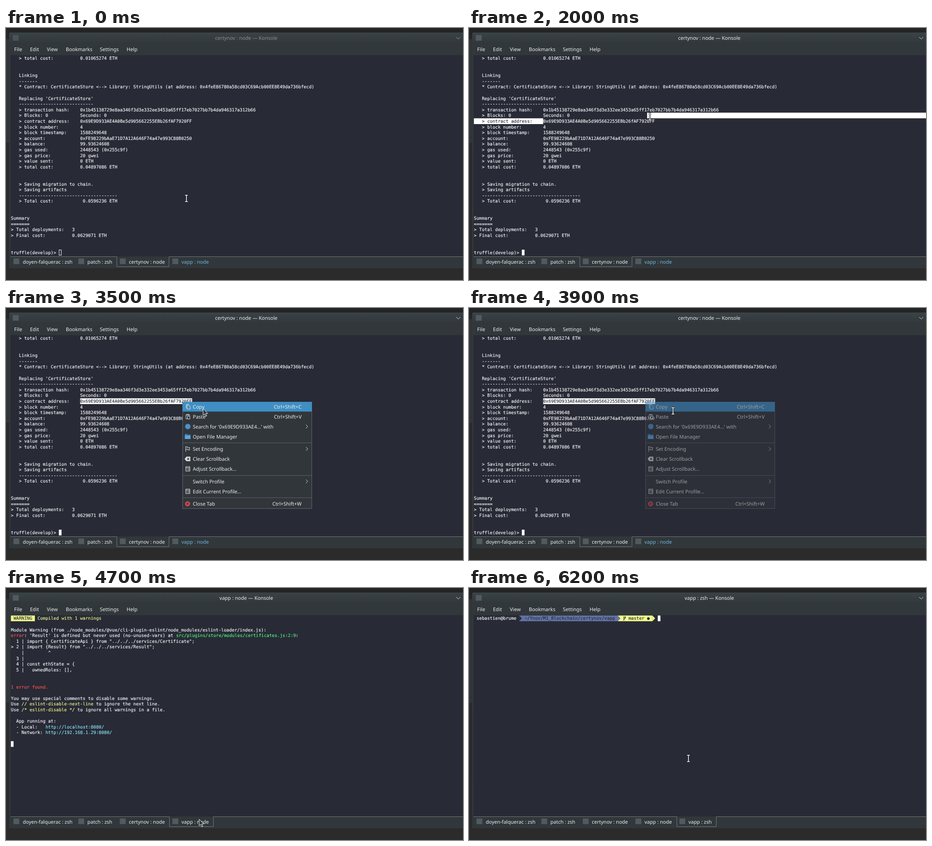
Animation, 1008 px wide and 556 px high, one loop 8000 ms. Source, as an HTML page:

```html
<!DOCTYPE html>
<html lang="en">
<head>
<meta charset="utf-8">
<title>Terminal session</title>
<style>
  html, body { margin: 0; width: 100%; height: 100%; overflow: hidden; background: #2a2b2c; }
  svg { display: block; width: 1008px; height: 556px; }
  text { white-space: pre; text-rendering: geometricPrecision; }
  .ui { font: 11px "Noto Sans", sans-serif; fill: #eff0f1; }
  .mono { font: 9.764px "DejaVu Sans Mono", monospace; color: #fcfcfc; }
  .mono text { fill: currentColor; stroke: currentColor; stroke-width: .15; }
  .dark { color: #282a36; }
  .line { fill: none; stroke: #e2e4e5; stroke-width: 1; }
</style>
</head>
<body>
<svg id="stage" viewBox="0 0 1008 556"></svg>
<script>
const LOOP = 8000, STEP = 100;
const CELL = 5.878, ROW = 12.6, LEFT = 10.8, TOP = 60.7;
const colX = c => LEFT + c * CELL;
const rowY = r => TOP + r * ROW;

const esc = s => s.replace(/&/g, '&amp;').replace(/</g, '&lt;');
const rect = (x, y, w, h, fill, extra = '') =>
  `<rect x="${x}" y="${y}" width="${w}" height="${h}" fill="${fill}" ${extra}/>`;
const path = (d, extra = 'class="line"') => `<path d="${d}" ${extra}/>`;
const label = (s, x, y, extra = '') => `<text class="ui" x="${x}" y="${y}" ${extra}>${esc(s)}</text>`;
const cells = (r, c, s, color) =>
  `<text x="${colX(c)}" y="${Math.round(rowY(r) + 9.75)}" ${color ? `style="color:${color}"` : ''}>${esc(s)}</text>`;
const block = (r, c) => rect(colX(c), rowY(r), CELL, ROW, '#fff');
const lines = list => list.map((s, r) => s ? cells(r, 0, s) : '').join('');

// Deployment output
const field = (name, value) => ('   > ' + name + ':').padEnd(26) + value;
const deploy = lines([
  field('total cost', '0.01065274 ETH'), '', '',
  '   Linking', '   -------',
  '   * Contract: CertificateStore <--> Library: StringUtils (at address: 0x4feE86780a58cd03C69Acb00EE8E49da736bfecd)', '',
  "   Replacing 'CertificateStore'", '   ' + '-'.repeat(28),
  field('transaction hash', '0x1b45138729e8aa346f3d3e332ee3453a65ff17eb7027bb7b4da946317a312b66'),
  '   > Blocks: 0'.padEnd(26) + 'Seconds: 0',
  field('contract address', '0x69E9D933AE4A0Be5d905662255EBb26fAF7920FF'),
  field('block number', '4'),
  field('block timestamp', '1588249648'),
  field('account', '0xFE98229bAaE71D7A12A646F74a47e993C88B0250'),
  field('balance', '99.93624608'),
  field('gas used', '2448543 (0x255c9f)'),
  field('gas price', '20 gwei'),
  field('value sent', '0 ETH'),
  field('total cost', '0.04897086 ETH'), '', '',
  '   > Saving migration to chain.', '   > Saving artifacts', '   ' + '-'.repeat(37),
  field('Total cost', ' 0.0596236 ETH'), '', '',
  'Summary', '=======',
  '> Total deployments:   3', '> Final cost:          0.0629071 ETH', '', '',
  'truffle(develop)> '
]);

// Dev server output
const RED = '#ff5555', GREEN = '#50fa7b', YELLOW = '#f1fa8c', CYAN = '#8be9fd', BLUE = '#6272a4';
const server = rect(LEFT, TOP, 9 * CELL, ROW, YELLOW) +
  cells(0, 1, 'WARNING', '#282a36') + cells(0, 10, 'Compiled with 1 warnings', YELLOW) +
  lines([
    '', '',
    'Module Warning (from ./node_modules/@vue/cli-plugin-eslint/node_modules/eslint-loader/index.js):',
    "     : 'Result' is defined but never used (no-unused-vars) at " + ' '.repeat(45) + ':',
    '  1 | import { CertificateApi } from "../../../services/Certificate";',
    '> 2 | import {Result} from "../../../services/Result";',
    '    |         ^', '  3 |', '  4 | const ethState = {', '  5 |   ownedRoles: [],',
    '', '', '', '',
    'You may use special comments to disable some warnings.',
    'Use ' + ' '.repeat(27) + ' to ignore the next line.',
    'Use ' + ' '.repeat(20) + ' to ignore all warnings in a file.', '',
    '  App running at:', '  - Local:', '  - Network:'
  ]) +
  cells(3, 0, 'error', RED) +
  cells(3, 62, 'src/plugins/store/modules/certificates.js:2:9', GREEN) +
  cells(12, 0, '1 error found.', RED) +
  cells(15, 4, '// eslint-disable-next-line', YELLOW) +
  cells(16, 4, '/* eslint-disable */', YELLOW) +
  cells(19, 13, 'http://localhost:8080/', CYAN) +
  cells(20, 13, 'http://192.168.1.29:8080/', CYAN) +
  block(22, 0);

// Shell prompt
const wedge = (c, fill) =>
  path(`M${colX(c)} ${TOP}l${CELL} ${ROW / 2}l${-CELL} ${ROW / 2}z`, `fill="${fill}"`);
const prompt = rect(colX(17), TOP, 37 * CELL, ROW, BLUE) + wedge(17, '#282a36') +
  rect(colX(54), TOP, 13 * CELL, ROW, YELLOW) + wedge(54, BLUE) + wedge(67, YELLOW) +
  cells(0, 1, 'sebastien@brume') +
  cells(0, 19, '~/Ynov/M1_Blockchain/certynov/vapp', '#282a36') +
  path('M341.5 62.5V72M341.5 69.5L344.5 66.5V64M342.8 65.5L344.5 63.5L346 65.5', 'fill="none" stroke="#282a36" stroke-width="1.1"') +
  cells(0, 58, 'master ●', '#282a36') + block(0, 69);

// Context menu: name, middle y, shortcut or ">" for a submenu
const entries = [
  ['Copy', 217.5, 'Ctrl+Shift+C'], ['Paste', 239.5, 'Ctrl+Shift+V'],
  ["Search for '0x69E9D933AE4...' with", 261.5, '>'], ['Open File Manager', 283.5],
  ['Set Encoding', 311, '>'], ['Clear Scrollback', 333], ['Adjust Scrollback...', 355],
  ['Switch Profile', 382.5, '>'], ['Edit Current Profile...', 404.5],
  ['Close Tab', 432, 'Ctrl+Shift+W']
];
const sheet = y => path(`M396.5 ${y - 5}h9v10h-9zM396.5 ${y - 2.5}h9M398 ${y}h1.5M398 ${y + 2.5}h1.5M401 ${y}h3.5M401 ${y + 2.5}h3.5`);
const menuIcons =
  path('M397.5 221.5v-9h6M399.5 214.5h4l2.5 2.5v6h-6.5z') +
  path('M399 235.5h-2v9h3M399 234.5h4v2h-4zM403 235.5h2v2M400.5 238.5h5v6.5h-5z') +
  '<circle cx="401" cy="261.5" r="6" fill="#4c8fc9"/>' +
  path('M394.5 278h5l1.5 1.5h6v9.5h-12.5z', 'fill="#3a7fbf"') +
  path('M394.5 281.5h12.5v7.5h-12.5z', 'fill="#5aa5e0"') +
  path('M396.5 305v12M396.5 306.5h4v1.5h5l-1.5 2.5l1.5 2.5h-5v-1.5h-4') +
  path('M394 333l4-5h8.5v10h-8.5z', 'fill="#e2e4e5"') +
  path('M399.5 330.5l4.5 5m0-5l-4.5 5', 'stroke="#31363b" stroke-width="1.3"') +
  sheet(355) + sheet(404.5) +
  '<circle cx="400.5" cy="432" r="5.5" fill="#da4453"/>' +
  path('M398.5 430l4 4m0-4l-4 4', 'stroke="#31363b" stroke-width="1.2"');
const menu = rect(389.5, 207.5, 285, 235, '#31363b', 'stroke="#63686c"') +
  rect(389.5, 207, 285, 21.5, '#3f8fc4', 'id="hot"') +
  [297, 369, 418].map(y => path(`M390 ${y}.5H674`, 'stroke="#5c6165"')).join('') + menuIcons +
  entries.map(([name, y, key]) => label(name, 412, y + 4) +
    (key === '>' ? path(`M661.5 ${y - 4}l4 4l-4 4`) : key ? label(key, 652, y + 4, 'text-anchor="end"') : '')).join('');

// Tabs: title, icon x, text x, left and right edge
const tabs = [
  ['doyen-falquerac : zsh', 16.5, 37, 10, 152], ['patch : zsh', 159.5, 179.5, 152, 244],
  ['certynov : node', 251, 271, 244.5, 359.5], ['vapp : node', 367, 387, 360.5, 457.5],
  ['vapp : zsh', 464, 484, 458.5, 545.5]
];
const icon = (x, y) => rect(x, y, 13, 12.5, '#515a5e');

const stage = document.getElementById('stage');
stage.innerHTML = `
  <defs>
    <linearGradient id="bar" x2="0" y2="1"><stop stop-color="#3b4347"/><stop offset="1" stop-color="#31373a"/></linearGradient>
    <linearGradient id="desk" x2="0" y2="1"><stop stop-color="#222425"/><stop offset=".1" stop-color="#2a2b2c"/><stop offset="1" stop-color="#2b2b2c"/></linearGradient>
    <clipPath id="picked"><path id="pickClip"/></clipPath>
  </defs>` +
  rect(0, 0, 1008, 556, 'url(#desk)') + rect(0, 25, 7, 228, '#333638') +
  path('M2 241.5h4', 'stroke="#202224"') +
  path('M7 530V13q0-3 3-3H1008V530z', 'fill="#31373a"') +
  path('M7 34V13q0-3 3-3H1008V34z', 'fill="url(#bar)"') +
  `<g id="appIcon">${icon(15, 15.5)}</g>` +
  label('', 530, 26, 'id="title" text-anchor="middle"') +
  path('M993 20l4.5 4.5l4.5-4.5', 'id="fold" class="line"') +
  [['File', 18], ['Edit', 53], ['View', 90], ['Bookmarks', 132], ['Settings', 207], ['Help', 266]]
    .map(([s, x]) => label(s, x, 51)).join('') +
  rect(10, 60, 998, 444, '#282a36') +
  `<g id="deploy" class="mono">${deploy}<path id="pick" fill="#fff"/>
     <g clip-path="url(#picked)"><g class="dark">${deploy}</g></g>
     <g id="solid">${block(34, 18)}</g>
     ${rect(colX(18) + .5, rowY(34) + .5, CELL - 1, ROW - 1, 'none', 'id="hollow" stroke="#fff"')}</g>
   <g id="server" class="mono">${server}</g>
   <g id="blank">${block(0, 0)}</g>
   <g id="prompt" class="mono">${prompt}</g>` +
  rect(360, 505, 97, 21.5, '#304f66', 'id="hover"') +
  path('', 'id="edge" fill="none" stroke="#74797c"') +
  tabs.map(([s, ix, x], i) => `<g id="tab${i}">${icon(ix, 508.5)}${label(s, x, 520)}</g>`).join('') +
  `<g id="menu">${menu}</g>
   <g id="beam">${['stroke="#17181c" stroke-width="3.6"', 'stroke="#fff" stroke-width="1.6"']
     .map(s => path('M-3-7h2.200l.8.700l.8-.7h2.200M0-6.300V6.300M-3 7h2.200l.8-.7l.8.700h2.200', 'fill="none" ' + s)).join('')}</g>
   <g id="arrow">${path('M0 0V14.5L3.4 11.5L5.8 17L8.2 16L5.8 10.7H10.3Z', 'fill="#31363b" stroke="#eff0f1" stroke-width="1"')}</g>
   <g id="hand">${path('M-1.5 10V1.5q1.5-1.5 3 0V7l6 1.5q1.5.5 1 2.5l-1.5 6H-2l-5-6q0-2 2-1.5z', 'fill="#31363b" stroke="#eff0f1" stroke-width="1"')}</g>`;

const el = {};
stage.querySelectorAll('[id]').forEach(n => el[n.id] = n);
const show = (id, on) => { el[id].style.display = on ? '' : 'none'; };

// Pointer path: time, x, y
const track = [
  [0, 398, 376], [100, 395, 370], [400, 280, 275], [700, 166, 208], [800, 156, 203], [900, 168, 203],
  [1000, 167, 203], [1100, 163.8, 203], [1300, 163.8, 203], [1600, 270, 203], [1800, 355, 202],
  [1900, 385, 200], [2000, 399, 196], [2100, 403, 199.5], [2200, 404, 203], [2300, 404, 203],
  [2400, 406, 203], [2800, 406, 203], [3100, 389, 207], [3200, 389, 207], [3600, 450, 227],
  [3900, 450, 227], [4000, 424, 285], [4100, 365, 390], [4200, 322, 470], [4300, 372, 518],
  [4400, 422, 516], [4600, 422, 516], [4700, 426, 510], [4800, 450, 455], [4900, 475, 400],
  [5000, 484, 376], [8000, 484, 376]
];
const fade = [[3100, 0], [3200, .1], [3300, .45], [3400, .8], [3500, 1], [3700, 1], [3800, .85], [3900, .58], [4000, .25], [4100, 0]];

function at(table, t, k) {
  const i = table.findIndex(p => p[0] >= t);
  if (i < 0) return table[table.length - 1][k];
  if (i === 0) return table[0][k];
  const a = table[i - 1], b = table[i];
  return a[k] + (b[k] - a[k]) * (t - a[0]) / (b[0] - a[0]);
}

const span = (r, x1, x2) => `M${x1} ${rowY(r)}H${x2}v${ROW}H${x1}z`;
function selection(t) {
  if (t < 1300) return '';
  const m = Math.min(t, 2400), pos = (at(track, m, 1) - 11) / CELL;
  if (at(track, m, 2) < 199) return span(10, colX(Math.floor(pos) - 1), 1008) + span(11, LEFT, colX(26));
  return span(11, colX(26), colX(Math.ceil(pos)));
}

function draw(now) {
  const t = Math.floor(now % LOOP / STEP) * STEP;
  const x = at(track, t, 1), y = at(track, t, 2);
  const current = t < 4700 ? 2 : t < 5800 ? 3 : 4;
  const active = t >= 1300, alpha = at(fade, t, 1);

  el.title.textContent = tabs[current][0] + ' — Konsole';
  el.title.style.fill = active ? '' : '#8b9093';
  el.fold.style.opacity = active ? 1 : .6;
  el.appIcon.style.opacity = active ? 1 : .75;

  show('deploy', current === 2);
  show('server', current === 3);
  show('blank', current === 4 && t < 6200);
  show('prompt', t >= 6200);
  show('solid', active);
  show('hollow', !active);
  const d = selection(t);
  el.pick.setAttribute('d', d);
  el.pickClip.setAttribute('d', d);

  const [, , , a, b] = tabs[current];
  el.edge.setAttribute('d', `M10 504.5H${a}V526.5H${b}V504.5H1008`);
  show('tab4', current === 4);
  show('hover', current === 2 && y > 504 && x > 359 && x < 457);
  el.tab3.querySelector('text').style.fill = current === 2 ? '#70b7dd' : '';

  el.menu.style.opacity = alpha;
  show('menu', alpha > 0);
  show('hot', t >= 3400);

  const onTabs = y > 504;
  const shape = onTabs || t >= 3100 && t < 3800 ? 'arrow' : t >= 4700 && t < 5600 ? 'hand' : 'beam';
  for (const id of ['beam', 'arrow', 'hand']) show(id, id === shape && !(t >= 5600 && t < 5800));
  el[shape].setAttribute('transform', `translate(${x} ${y})`);
}

const start = performance.now();
function tick() {
  draw(performance.now() - start);
  requestAnimationFrame(tick);
}
draw(0);
tick();
</script>
</body>
</html>
```
